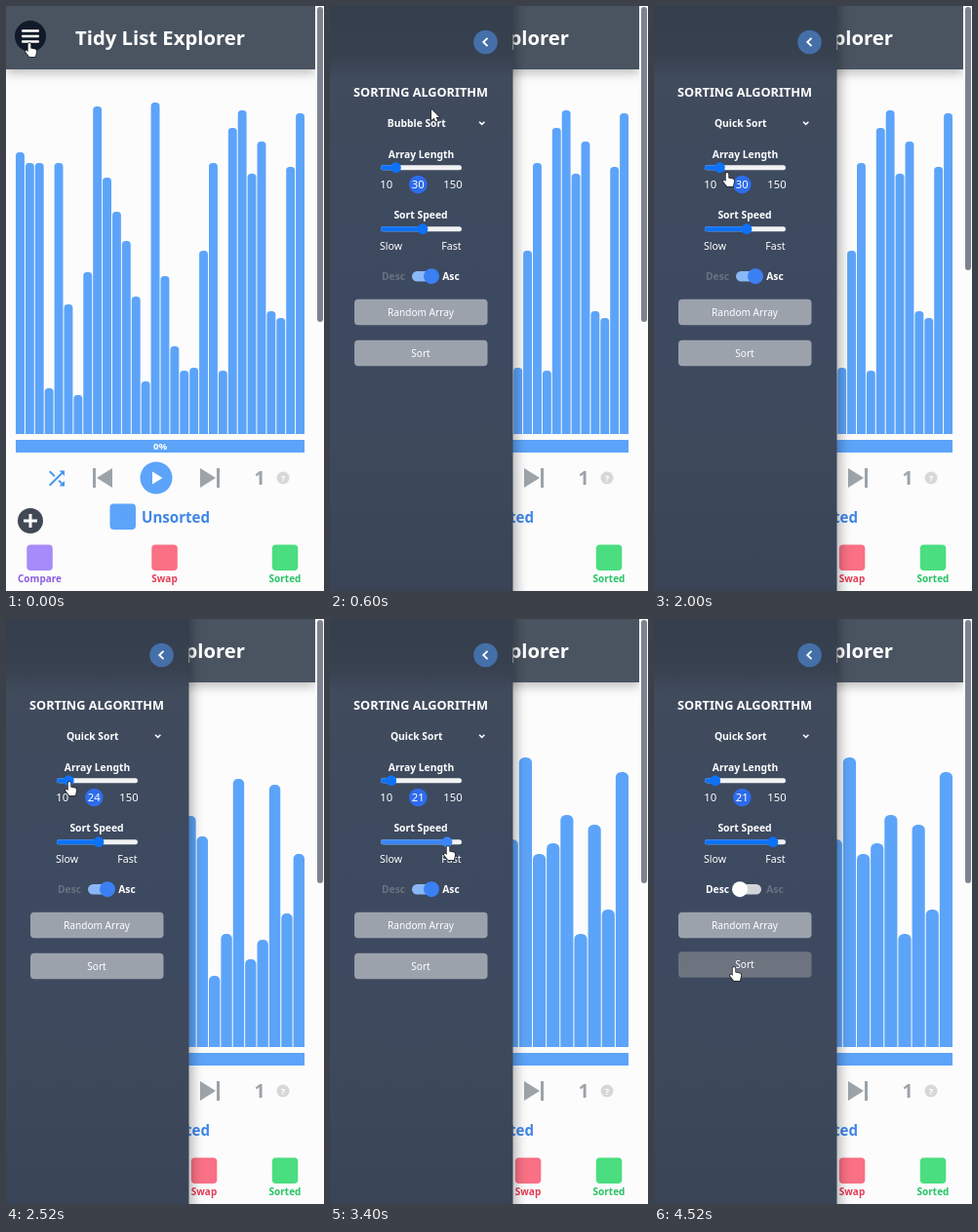
Recreate the animation shown at these times as an HTML page with a canvas. Size 326 by 600 pixels, loop 4.6 s.

```html
<!DOCTYPE html>
<html lang="en">
<head>
<meta charset="utf-8">
<title>Tidy List Explorer</title>
<style>
html, body { margin: 0; width: 100%; height: 100%; overflow: hidden; background: #fcfcfc; }
canvas { display: block; width: 326px; height: 600px; }
</style>
</head>
<body>
<canvas id="stage"></canvas>
<script>
const W = 326, H = 600, LOOP = 4600, STEP = 40;
const canvas = document.getElementById('stage');
const ratio = window.devicePixelRatio || 1;
canvas.width = W * ratio;
canvas.height = H * ratio;
const c = canvas.getContext('2d');

const BLUE = '#5ca4f9', GREY = '#9ca3a9', SLATE = '#4a5461', ACCENT = '#0d72f7';
const ALGORITHMS = ['Bubble', 'Insertion', 'Selection', 'Shell', 'Quick', 'Merge', 'Heap'];

// Bar tops; shorter lists are aligned to the right edge.
const TOPS = {
  30: [150, 161, 161, 392, 161, 306, 399, 273, 103, 176, 211, 241, 298, 385, 99,
       277, 349, 374, 371, 251, 161, 374, 125, 107, 172, 139, 313, 320, 165, 110],
  24: [202, 223, 366, 323, 164, 349, 329, 170, 302, 241],
  21: [226, 142, 241, 230, 201, 323, 211, 298, 157]
};

// Timeline
const PANEL_IN = [120, 440], OPEN_LIST = 880, PICK = 1640, TOGGLE = 3960;
const LENGTH = [[2120, 30], [2520, 24], [2640, 21]];
const SPEED = [[2960, 95], [3400, 120], [3480, 122]];
const CURSOR = [
  [0, 24, 38], [160, 25, 38], [600, 104, 106], [800, 117, 117], [960, 117, 120],
  [1160, 117, 135], [1520, 110, 196], [1680, 108, 196], [2000, 75, 171],
  [2120, 68, 167], [2520, 65, 167], [2640, 63, 167], [2720, 63, 167],
  [2920, 95, 231], [2960, 95, 231], [3400, 121, 233], [3520, 123, 233],
  [3680, 123, 234], [3920, 101, 274], [4080, 100, 275], [4360, 83, 355], [4520, 82, 357]
];

const clamp = v => Math.max(0, Math.min(1, v));
const ease = v => v * v * (3 - 2 * v);
const progress = (t, a, b) => ease(clamp((t - a) / (b - a)));

function track(keys, t, col = 1, smooth = v => v) {
  if (t <= keys[0][0]) return keys[0][col];
  for (let i = 1; i < keys.length; i++) {
    const a = keys[i - 1], b = keys[i];
    if (t <= b[0]) return a[col] + (b[col] - a[col]) * smooth((t - a[0]) / (b[0] - a[0]));
  }
  return keys[keys.length - 1][col];
}

function noise(n) {
  const s = Math.sin(n * 127.1 + 3.7) * 43758.5453;
  return s - Math.floor(s);
}

function box(x, y, w, h, fill, r = 0) {
  c.fillStyle = fill;
  c.beginPath();
  c.roundRect(x, y, w, h, r);
  c.fill();
}

function disc(x, y, r, fill) {
  c.fillStyle = fill;
  c.beginPath();
  c.arc(x, y, r, 0, Math.PI * 2);
  c.fill();
}

function poly(points, fill) {
  c.fillStyle = fill;
  c.beginPath();
  points.forEach(([x, y]) => c.lineTo(x, y));
  c.closePath();
  c.fill();
}

function line(points, color, width) {
  c.strokeStyle = color;
  c.lineWidth = width;
  c.beginPath();
  points.forEach(([x, y], i) => i ? c.lineTo(x, y) : c.moveTo(x, y));
  c.stroke();
}

// y is the middle of the capital letters.
function text(str, x, y, size, color, weight = 700, align = 'center') {
  c.font = `${weight} ${size}px "Noto Sans", "Open Sans", sans-serif`;
  c.textAlign = align;
  c.fillStyle = color;
  c.fillText(str, x, y + size * 0.357);
}

function shadow(color, blur, dx, dy, draw) {
  c.save();
  c.shadowColor = color;
  c.shadowBlur = blur * ratio;
  c.shadowOffsetX = dx * ratio;
  c.shadowOffsetY = dy * ratio;
  draw();
  c.restore();
}

function header(t) {
  shadow('rgba(0,0,0,.25)', 10, 0, 4, () => box(0, 0, 317, 65, SLATE));
  text('Tidy List Explorer', 158, 32.5, 20.3, '#fff');
  disc(25, 31, 16, t < 280 ? '#111a28' : '#2c3746');
  for (const y of [25.5, 31, 36.5]) box(16, y - 1.2, 18, 2.4, '#fff', 1);
}

function bars(count) {
  const gap = 1, pitch = (296 + gap) / count, w = pitch - gap;
  const known = TOPS[count] || [], skip = count - known.length;
  for (let i = 0; i < count; i++) {
    const top = i >= skip ? known[i - skip] : 100 + 300 * noise(count * 50 + i);
    box(10 + i * pitch, top, w, 439 - top, BLUE, [w * 0.42, w * 0.42, 0, 0]);
  }
}

function shuffleIcon(x, y, ink) {
  c.save();
  c.translate(x, y);
  line([[-7.3, -7.3], [-2.1, -2.1]], ink, 2);
  line([[-7.3, 7.3], [6, -6]], ink, 2);
  line([[2.1, 2.1], [6, 6]], ink, 2);
  poly([[2.5, -8], [8, -8], [8, -2.5]], ink);
  poly([[2.5, 8], [8, 8], [8, 2.5]], ink);
  c.restore();
}

function controls() {
  box(10, 445, 296, 13, BLUE);
  text('0%', 158, 451.5, 9.6, '#fff');
  shuffleIcon(52, 484.5, '#4b96ef');
  box(89, 474, 3, 20, GREY);
  poly([[109, 474], [109, 494], [93, 484]], GREY);
  disc(154, 484, 16.5, BLUE);
  poly([[150, 477.5], [160.5, 484], [150, 490.5]], '#fff');
  poly([[199, 474], [199, 494], [215, 484]], GREY);
  box(216, 474, 3, 20, GREY);
  text('1', 260, 484.5, 19.5, GREY);
  disc(284, 484, 6.5, '#d6d7d9');
  text('?', 284, 484.5, 9.5, '#fff');
}

function legend(quick) {
  box(106.5, 510.5, 26.5, 26.5, BLUE, 4);
  text('Unsorted', 139, 524.5, 15.1, '#4086e8', 700, 'left');
  disc(25, 528, 13, '#414954');
  box(18, 526.5, 14, 3, '#fff');
  box(23.5, 521, 3, 14, '#fff');
  const items = [
    ['Compare', 34.5, '#a78bfa', '#8b5ce0'],
    ['Swap', quick ? 203 : 162.5, '#fa7085', '#e53b55'],
    ['Sorted', 286, '#4ade80', '#25c463']
  ];
  if (quick) items.push(['Pivot', 118, '#facc15', '#d6a50a']);
  for (const [name, x, fill, ink] of items) {
    box(x - 13.2, 552.5, 26.5, 26.5, fill, 4);
    text(name, x, 587, 10, ink);
  }
}

function slider(x, y, fill) {
  box(52, y - 2.5, 83, 5, '#f1f2f4', 2.5);
  box(52, y - 2.5, x - 52, 5, fill, 2.5);
  disc(x, y, 5.4, fill);
}

function button(label, y, fill) {
  box(25, y, 136.5, 26.5, fill, 4);
  text(label, 93, y + 13.5, 10.1, '#fff', 400);
}

function toggle(t) {
  const off = progress(t, TOGGLE, TOGGLE + 160), isOff = off > 0.5;
  text('Desc', 65, 277.5, 10.3, isOff ? '#fff' : '#687282');
  text('Asc', 124, 277.5, 10.3, isOff ? '#687282' : '#fff');
  box(84, 272, 26, 10.5, isOff ? '#d2d4d8' : '#8ab8f7', 5.2);
  disc(104 - 16 * off, 277.2, 8, isOff ? '#fdfdfd' : '#3b80f2');
}

function list(y) {
  shadow('rgba(0,0,0,.4)', 4, 0, 2, () => box(25, 127, 136.5, 112, '#6f7784'));
  box(25.7, 127.7, 135.1, 110.6, '#fdfdfd');
  const hover = Math.max(0, Math.min(4, Math.floor((y - 128) / 15.7)));
  ALGORITHMS.forEach((name, i) => {
    const top = 128 + i * 15.7;
    if (i === hover) box(25.7, top, 135.1, 15.8, '#1e90ff');
    text(name + ' Sort', 94, top + 8, 10.3, i === hover ? '#fff' : '#8c9097');
  });
}

function panel(t, count, cursorY) {
  const shown = progress(t, ...PANEL_IN);
  if (!shown) return;
  c.save();
  c.translate(-200 * (1 - shown), 0);
  const g = c.createLinearGradient(0, 0, 0, H);
  [[0, '#343e4c'], [0.085, '#374150'], [0.125, '#404b5c'], [0.5, '#3c4960'],
   [0.74, '#3f495c'], [1, '#394457']].forEach(([at, color]) => g.addColorStop(at, color));
  shadow('rgba(0,0,0,.3)', 11, 3, 0, () => box(0, -10, 187.5, H + 20, g));

  disc(159.5, 37, 12.3, '#456fa8');
  line([[161.5, 32.8], [157.2, 37], [161.5, 41.2]], '#fff', 1.8);
  text('SORTING ALGORITHM', 93, 88, 12.7, '#fff');
  const name = t < PICK ? 'Bubble Sort' : 'Quick Sort';
  text(name, 88.7, 120, 10.3, '#fff');
  line([[153, 118.8], [155.7, 121.4], [158.4, 118.8]], '#fff', 1.5);

  text('Array Length', 93.5, 152, 10.3, '#fff');
  slider(57 + (count - 10) / 140 * 73, 165.7, ACCENT);
  text('10', 57.8, 183, 11.3, '#fff', 400);
  disc(90.3, 183, 9.3, '#2d6cec');
  text(count, 90.3, 183, 11.3, '#fff', 400);
  text('150', 126, 183, 11.3, '#fff', 400);

  text('Sort Speed', 93, 214.5, 10.4, '#fff');
  slider(track(SPEED, t), 228.7, t > 2900 && t < 3520 ? '#3b86f5' : ACCENT);
  text('Slow', 62.5, 246, 10.6, '#fff', 400);
  text('Fast', 124.5, 246, 10.6, '#fff', 400);

  toggle(t);
  button('Random Array', 300.7, '#9ba2ac');
  const over = t >= 4320;
  button('Sort', over ? 341.3 : 342.7, over ? '#6d7480' : '#9ba2ac');
  if (t >= OPEN_LIST && t < PICK) list(cursorY);
  c.restore();
}

// The extra legend entry makes the page longer, so the thumb shrinks.
function scrollbar(quick) {
  box(317, 0, 9, H, '#fcfcfc');
  box(319, 1, 6, quick ? 270 : 323, '#7d838e', 3);
}

function outlined(path) {
  c.lineJoin = 'round';
  c.strokeStyle = '#222';
  c.lineWidth = 1.6;
  c.stroke(path);
  c.fillStyle = '#fff';
  c.fill(path);
}

const ARROW = new Path2D('M0 0V11L2.6 8.7L4.4 12.5L6.3 11.6L4.5 8H8Z');
const HAND = new Path2D('M-1.3 1Q0-.8 1.3 1V5.5L6 6.6Q7.3 7 7.2 8.4L6 14H0L-3.9 9Q-4.4 7.3-2.7 7.8L-1.3 9Z');

function cursor(t, x, y) {
  const arrow = t > 280 && t < 1800;
  c.save();
  c.translate(x, y);
  outlined(arrow ? ARROW : HAND);
  c.restore();
}

function render(now) {
  const t = Math.floor((now % LOOP) / STEP) * STEP;
  const x = track(CURSOR, t, 1, ease), y = track(CURSOR, t, 2, ease);
  const count = Math.round(track(LENGTH, t));
  const quick = t >= PICK;
  c.setTransform(ratio, 0, 0, ratio, 0, 0);
  box(0, 0, W, H, '#fcfcfc');
  header(t);
  bars(count);
  controls();
  legend(quick);
  scrollbar(quick);
  panel(t, count, y);
  cursor(t, x, y);
}

function loop() {
  render(performance.now());
  requestAnimationFrame(loop);
}
loop();
</script>
</body>
</html>
```
